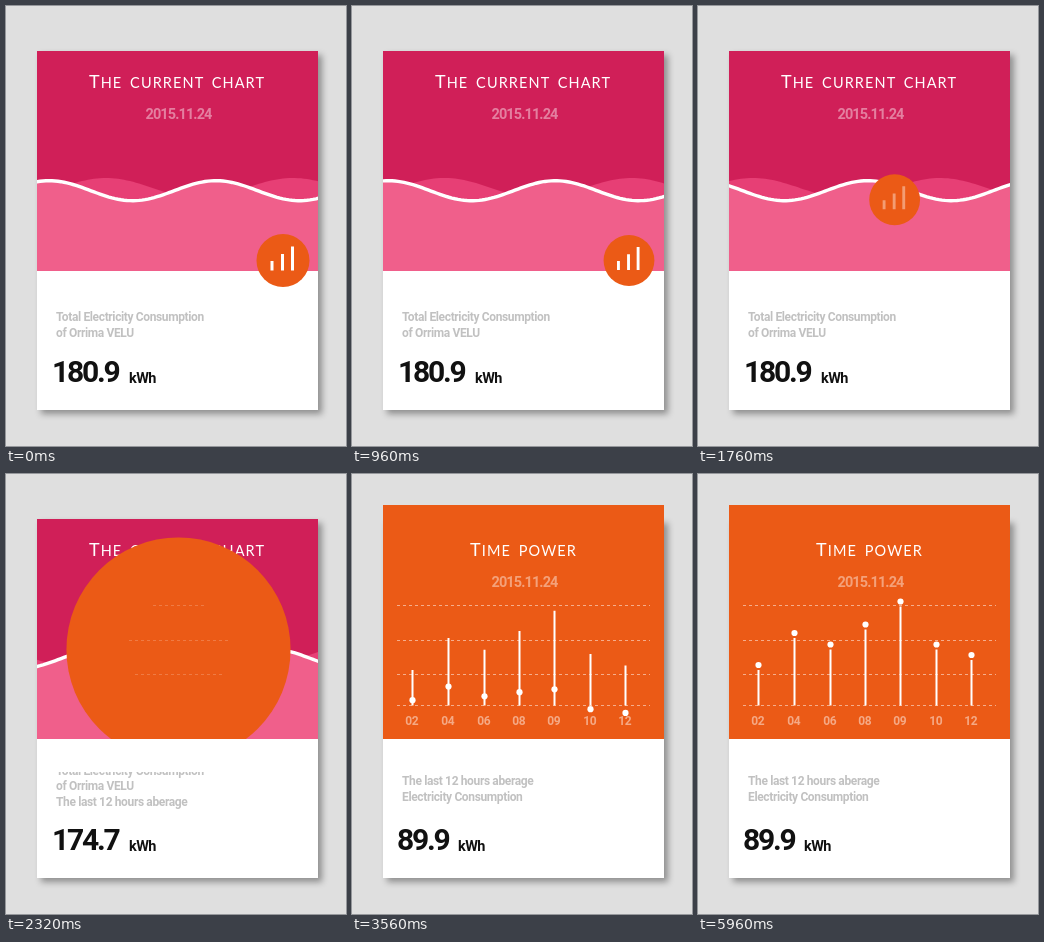
Animation, 340 px wide and 440 px high, one loop 8120 ms. Source, as an HTML page:

```html
<!DOCTYPE html>
<html lang="en">
<head>
<meta charset="utf-8">
<title>Energy card</title>
<style>
  html, body { margin: 0; width: 100%; height: 100%; overflow: hidden; background: #dfdfdf; }
  svg { display: block; width: 340px; height: 440px; font-family: Roboto, "Liberation Sans", sans-serif; font-weight: 700; }
  .card { fill: #fff; filter: drop-shadow(4px 4px 3px rgba(0, 0, 0, .36)); }
  .title { font: 400 14.5px Lato, sans-serif; letter-spacing: 1.1px; word-spacing: 3px; fill: #fff; text-anchor: middle; }
  .title tspan { font-size: 18px; }
  .date { font-size: 14.5px; letter-spacing: -.9px; fill: #fff; fill-opacity: .43; text-anchor: middle; }
  .grid { stroke: #fff; stroke-opacity: .5; stroke-dasharray: 3 3; }
  .hours { font-size: 12px; letter-spacing: -.5px; fill: #fff; fill-opacity: .48; text-anchor: middle; }
  .bars { stroke: #fff; stroke-width: 2; }
  .dots { fill: #fff; }
  .icon { stroke: #fff; stroke-width: 3; }
  .caption { font-size: 12px; letter-spacing: -.37px; fill: #c1c1c1; }
  .value { font-size: 30px; letter-spacing: -2.2px; fill: #111; }
  .unit { font-size: 14.5px; letter-spacing: -.6px; fill: #111; }
  .orange { fill: #eb5a16; }
</style>
</head>
<body>
<svg viewBox="0 0 340 440">
  <defs>
    <clipPath id="header"><rect x="31" y="45" width="281" height="220"/></clipPath>
    <clipPath id="panel"><rect id="panelBox" x="31" y="31" width="281" height="409"/></clipPath>
    <clipPath id="reveal"><circle id="revealCircle" cx="172.5" cy="175.5"/></clipPath>
    <clipPath id="captionBox"><rect x="40" y="298" width="260" height="37"/></clipPath>
  </defs>

  <rect class="card" x="31" y="45" width="281" height="359"/>

  <g clip-path="url(#header)">
    <rect x="31" y="45" width="281" height="220" fill="#d01f58"/>
    <path id="backWave" fill="#e73f75"/>
    <path id="frontWave" fill="#f05f8b"/>
    <path id="crest" fill="none" stroke="#fff" stroke-width="3.4"/>
    <text class="title" x="171" y="82"><tspan>T</tspan>HE CURRENT CHART</text>
    <text class="date" x="172.5" y="113">2015.11.24</text>
  </g>

  <g clip-path="url(#panel)">
    <circle id="button" class="orange"/>
    <g id="icon" class="icon"><path d="M-11 .5V10M-.5-6.5V10M9.5-14V10"/></g>
  </g>

  <g id="chart" clip-path="url(#reveal)">
    <text class="title" x="171.5" y="82"><tspan>T</tspan>IME POWER</text>
    <text class="date" x="172.5" y="113">2015.11.24</text>
    <path class="grid" d="M45 131.5H298M45 166.5H298M45 200.5H298M45 231.5H298"/>
    <g id="hours" class="hours"></g>
  </g>
  <path id="bars" class="bars"/>
  <g id="dots" class="dots"></g>

  <g clip-path="url(#captionBox)">
    <g id="captions" class="caption">
      <text x="50" y="315">Total Electricity Consumption</text>
      <text x="50" y="330.5">of Orrima VELU</text>
      <text x="50" y="346">The last 12 hours aberage</text>
      <text x="50" y="361.5">Electricity Consumption</text>
    </g>
  </g>
  <text id="value" class="value" y="376"></text>
  <text id="unit" class="unit" y="377">kWh</text>
</svg>

<script>
const LOOP = 8120, STEP = 40, BASE = 231.5, DOT_START = 259;
const hours = [
  { label: '02', x: 60.5, top: 191 },
  { label: '04', x: 96.5, top: 159 },
  { label: '06', x: 132.5, top: 170.5 },
  { label: '08', x: 167.5, top: 150.5 },
  { label: '09', x: 202.5, top: 127.5 },
  { label: '10', x: 238.5, top: 170.5 },
  { label: '12', x: 273.5, top: 181, drift: -5 }
];

const el = id => document.getElementById(id);
const set = (node, attrs) => {
  for (const name in attrs) node.setAttribute(name, attrs[name]);
  return node;
};
const add = (parent, tag, attrs) =>
  parent.appendChild(set(document.createElementNS('http://www.w3.org/2000/svg', tag), attrs));

const span = (t, start, length) => Math.min(1, Math.max(0, (t - start) / length));
const smooth = p => (1 - Math.cos(Math.PI * p)) / 2;
const easeOut = p => 1 - (1 - p) ** 2;
const mix = (a, b, p) => a + (b - a) * p;

for (const hour of hours) {
  add(el('hours'), 'text', { x: hour.x - .8, y: 251 }).textContent = hour.label;
  hour.dot = add(el('dots'), 'circle', { cx: hour.x, r: 3.1 });
}

function wave(mid, peak, period) {
  const points = [];
  for (let x = 28; x <= 316; x += 3)
    points.push(x + ' ' + (mid - 10 * Math.cos((x - peak) / period * 2 * Math.PI)).toFixed(2));
  return 'M' + points.join('L');
}

function drawWaves(t) {
  const turns = t / 1000;
  const front = wave(184.7, 43 + 167 * turns, 167);
  set(el('backWave'), { d: wave(182, 100 + 187 * turns, 187) + 'V266H28Z' });
  set(el('frontWave'), { d: front + 'V266H28Z' });
  set(el('crest'), { d: front });
}

function drawButton(t) {
  const move = smooth(span(t, 1440, 470));
  const rest = mix(26.5, 25.4, smooth(span(t, 760, 200)));
  const cx = mix(277, 172.5, move), cy = mix(254.5, 175.5, move);
  set(el('button'), { cx, cy, r: mix(rest, 219, smooth(span(t, 2040, 600))) });
  set(el('icon'), {
    transform: `translate(${cx} ${cy}) scale(${rest / 26.5})`,
    opacity: 1 - span(t, 1520, 400)
  });
  set(el('panelBox'), { height: t < 2000 ? 409 : 234 });
}

function drawChart(t) {
  set(el('revealCircle'), { r: 205 * smooth(span(t, 2160, 480)) });
  set(el('chart'), { opacity: span(t, 2120, 500) });
  const drifting = 1 - span(t, 4200, 1760);
  let bars = '';
  hours.forEach(({ x, top, drift = 9.5, dot }, i) => {
    const grow = easeOut(span(t, 2918 + 42 * i, 600));
    if (grow > 0) bars += `M${x} ${BASE}V${mix(BASE, top + 5, grow)}`;
    const rise = span(t, 3307 + 26 * i, 750);
    set(dot, {
      cy: mix(DOT_START, top + drift * drifting, easeOut(rise)),
      opacity: Math.min(1, rise * 10)
    });
  });
  set(el('bars'), { d: bars });
}

function drawReading(t) {
  const reading = mix(180.9, 89.9, smooth(span(t, 2165, 920)));
  const wide = reading >= 99.95;
  el('value').textContent = reading.toFixed(1);
  set(el('value'), { x: wide ? 46 : 45 });
  set(el('unit'), { x: wide ? 123 : 106 });
  set(el('captions'), { transform: `translate(0 ${-35 * smooth(span(t, 2100, 500))})` });
}

// One stepped clock keeps the counter, waves and chart together.
function draw() {
  const t = Math.floor(performance.now() % LOOP / STEP) * STEP;
  drawWaves(t);
  drawButton(t);
  drawChart(t);
  drawReading(t);
  requestAnimationFrame(draw);
}
draw();
</script>
</body>
</html>
```
